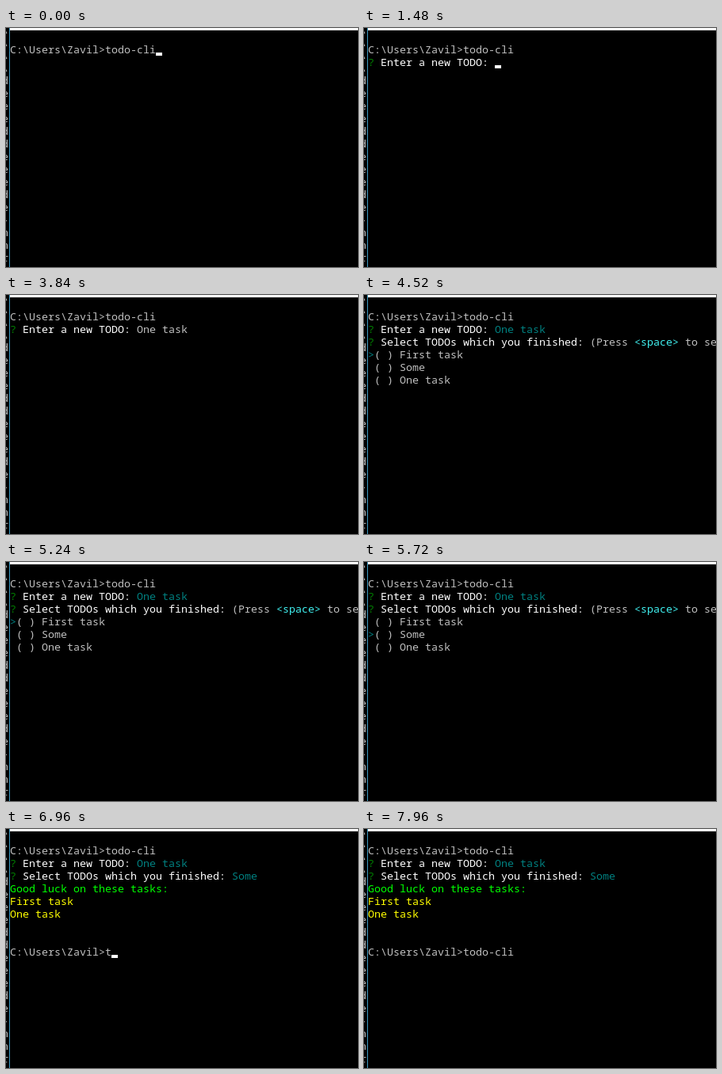
These frames come from a looping animation (444x302 px, 8 s). An HTML page:

```html
<!DOCTYPE html>
<html lang="en">
<head>
<meta charset="utf-8">
<style>
  html, body { margin: 0; width: 100%; height: 100%; overflow: hidden; background: #000; }
  #stage { position: relative; width: 444px; height: 302px; overflow: hidden; background: #000;
    font: 13.333px/16px "Noto Sans Mono", monospace; font-variant-ligatures: none; }
  #titlebar { position: absolute; left: 5px; top: 0; right: 0; height: 3px; background: #fff; }
  #behind { position: absolute; left: 0; top: 0; width: 4px; height: 302px; overflow: hidden;
    border-right: 1px solid #3c98c0; }
  #behind span, #screen span { position: absolute; white-space: pre; }
  #behind span { left: -5px; color: #c0c0c0; }
  #cursor { position: absolute; width: 8px; height: 4px; background: #fff; }
</style>
</head>
<body>
<div id="stage">
  <div id="behind"></div>
  <div id="titlebar"></div>
  <div id="screen"></div>
  <div id="cursor"></div>
</div>
<script>
const LOOP = 8000, LEFT = 5, TOP = 19, CELL = 8, LINE = 16;
const BLINK = 530, BLINK_START = 1070, SOLID_AFTER_KEY = 160;
const COLOR = {
  plain: '#c0c0c0', bright: '#ffffff', mark: '#008000', answer: '#008080',
  key: '#40f0f0', pointer: '#008080', success: '#00ff00', task: '#ffff00'
};
const PROMPT = 'C:\\Users\\Zavil>', COMMAND = 'todo-cli', NEW_TASK = 'One task';
const TASKS = ['First task', 'Some', NEW_TASK];

// Moments at which the session moves on
const ENTER = 40, ASK = 400, LIST = 4280, DOWN = 5520, CHECK = 5960, DONE = 6720, READY = 6840;
const TASK_KEYS = [2880, 3040, 3200, 3280, 3360, 3440, 3560, 3680];
const COMMAND_KEYS = Array.from(COMMAND, (_, i) => 6960 + i * 80);
const EVENTS = [0, ENTER, ASK, ...TASK_KEYS, LIST, READY, ...COMMAND_KEYS];

const screenBox = document.getElementById('screen');
const cursorBox = document.getElementById('cursor');
const behind = document.getElementById('behind');

function addText(parent, text, top, left, color) {
  const span = document.createElement('span');
  span.textContent = text;
  span.style.top = top + 'px';
  if (left !== undefined) span.style.left = left + 'px';
  if (color) span.style.color = color;
  parent.append(span);
}

[...'\\\\\\\\deeeddeeede-nnr'].forEach((letter, i) => addText(behind, letter, i * LINE - 6));

const typed = (text, keys, t) => text.slice(0, keys.filter(k => k <= t).length);

// Runs of [row, column, text, color] and the cursor cell, or null when hidden
function session(t) {
  const runs = [[0, 0, PROMPT + COMMAND, COLOR.plain]];
  const put = (row, col, text, color) => runs.push([row, col, text, COLOR[color]]);
  if (t < ENTER) return { runs, cursor: [0, PROMPT.length + COMMAND.length] };
  if (t < ASK) return { runs, cursor: [1, 0] };

  put(1, 0, '?', 'mark');
  put(1, 2, 'Enter a new TODO:', 'bright');
  if (t < LIST) {
    const input = typed(NEW_TASK, TASK_KEYS, t);
    put(1, 20, input, 'plain');
    return { runs, cursor: [1, 20 + input.length] };
  }

  put(1, 20, NEW_TASK, 'answer');
  put(2, 0, '?', 'mark');
  put(2, 2, 'Select TODOs which you finished:', 'bright');
  if (t < DONE) {
    if (t < CHECK) {
      put(2, 35, '(Press', 'plain');
      put(2, 42, '<space>', 'key');
      put(2, 50, 'to select', 'plain');
    }
    put(t < DOWN ? 3 : 4, 0, '>', 'pointer');
    TASKS.forEach((task, i) => {
      const checked = i === 1 && t >= CHECK;
      put(3 + i, 1, checked ? '(*)' : '( )', checked ? 'mark' : 'plain');
      put(3 + i, 5, task, 'plain');
    });
    return { runs, cursor: null };
  }

  put(2, 35, TASKS[1], 'answer');
  put(3, 0, 'Good luck on these tasks:', 'success');
  put(4, 0, TASKS[0], 'task');
  put(5, 0, TASKS[2], 'task');
  if (t < READY) return { runs, cursor: [6, 0] };
  const line = PROMPT + typed(COMMAND, COMMAND_KEYS, t);
  put(8, 0, line, 'plain');
  return { runs, cursor: [8, line.length] };
}

function cursorLit(t) {
  const lastEvent = Math.max(...EVENTS.filter(e => e <= t));
  return t - lastEvent < SOLID_AFTER_KEY || Math.floor((t - BLINK_START) / BLINK) % 2 === 0;
}

let shown = '';
function draw(now) {
  const t = now % LOOP;
  const { runs, cursor } = session(t);
  const key = JSON.stringify(runs);
  if (key !== shown) {
    shown = key;
    screenBox.replaceChildren();
    for (const [row, col, text, color] of runs)
      addText(screenBox, text, TOP + row * LINE, LEFT + col * CELL, color);
  }
  cursorBox.hidden = !cursor || !cursorLit(t);
  if (cursor) {
    cursorBox.style.top = TOP + cursor[0] * LINE + 12 + 'px';
    cursorBox.style.left = LEFT + cursor[1] * CELL + 'px';
  }
  requestAnimationFrame(() => draw(performance.now() - start));
}
const start = performance.now();
draw(0);
</script>
</body>
</html>
```
